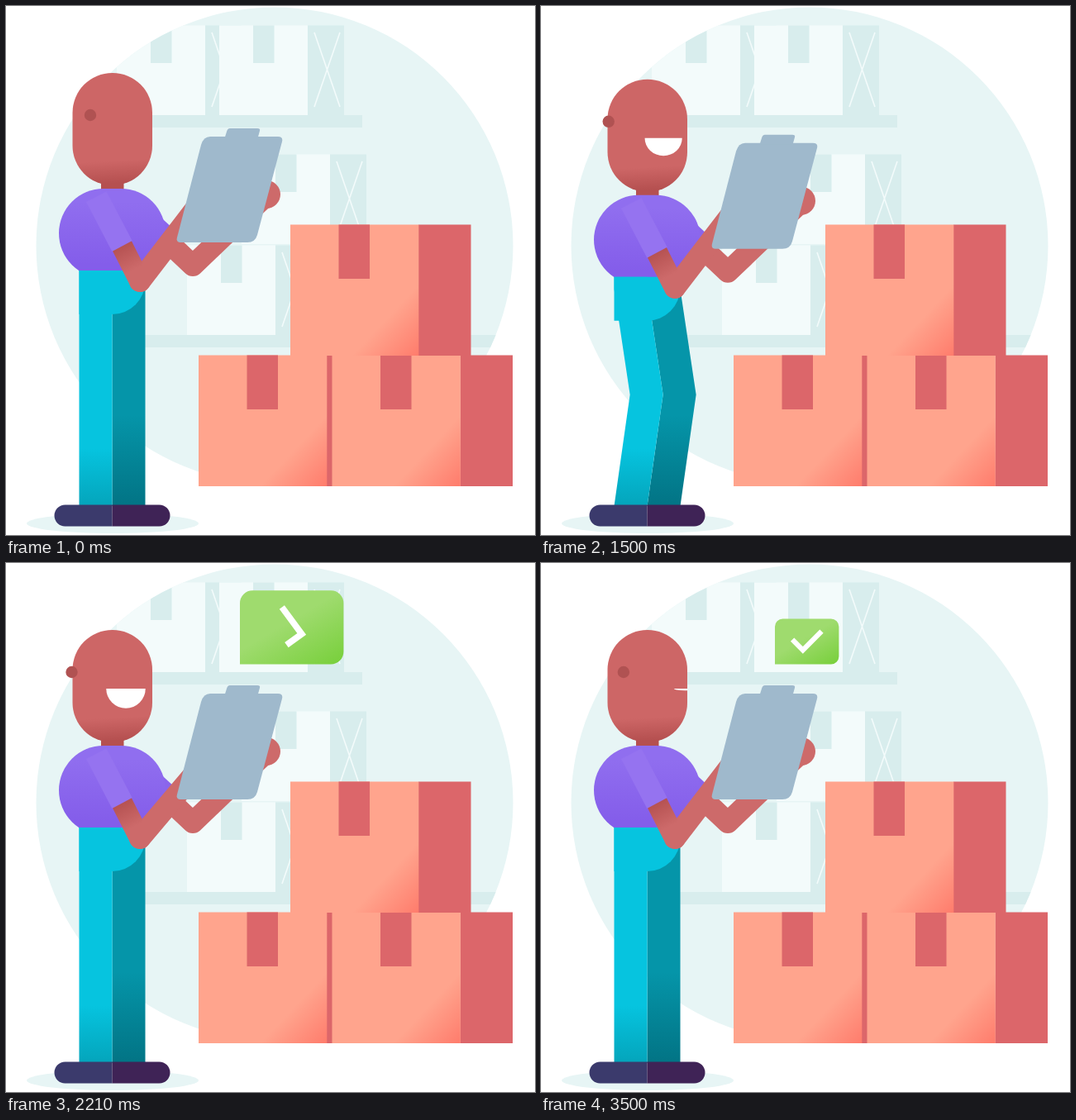
Write an HTML page that moves like this. It is 640 by 640 pixels and loops after 3.57 s.

```html
<!DOCTYPE html>
<html lang="en">
<head>
<meta charset="utf-8">
<title>Warehouse check</title>
<style>
  html, body { margin: 0; width: 100%; height: 100%; overflow: hidden; background: #fff; }
  svg { display: block; width: 100vw; height: 100vh; }
  .skin { fill: none; stroke: #cd6a6a; stroke-width: 26; stroke-linecap: round; stroke-linejoin: round; }
  .pale { fill: #f3fbfb; }
  .mist { fill: #d8eded; }
  .cross { fill: none; stroke: #f3fbfb; stroke-width: 1.6; }
  .card { fill: url(#card); }
  .tape { fill: #dc666a; }
</style>
</head>
<body>
<svg viewBox="0 0 640 640">
  <defs>
    <linearGradient id="card" x1=".73" y1=".74" x2="1" y2="1">
      <stop stop-color="#ffa48d"/><stop offset="1" stop-color="#ff7c6c"/>
    </linearGradient>
    <linearGradient id="green" x1=".5" y1=".4" x2="1" y2="1">
      <stop stop-color="#9fdb6e"/><stop offset="1" stop-color="#77cf3a"/>
    </linearGradient>
    <linearGradient id="face" x1="0" y1="0" x2=".04" y2="1">
      <stop offset=".8" stop-color="#cd6666"/><stop offset="1" stop-color="#b55050"/>
    </linearGradient>
    <linearGradient id="shirt" x2="0" y2="1">
      <stop offset=".15" stop-color="#906eef"/><stop offset=".85" stop-color="#845dea"/>
    </linearGradient>
    <linearGradient id="nearLegFill" gradientUnits="userSpaceOnUse" x1="0" y1="535" x2="0" y2="604">
      <stop stop-color="#06c4df"/><stop offset="1" stop-color="#04a5bc"/>
    </linearGradient>
    <linearGradient id="farLegFill" gradientUnits="userSpaceOnUse" x1="0" y1="495" x2="0" y2="604">
      <stop stop-color="#0595a9"/><stop offset="1" stop-color="#027485"/>
    </linearGradient>
    <linearGradient id="upperArm" gradientUnits="userSpaceOnUse" x1="139" y1="288" x2="155" y2="319">
      <stop stop-color="#b45050"/><stop offset="1" stop-color="#cd6a6a"/>
    </linearGradient>
    <clipPath id="disc"><circle cx="325" cy="290" r="288.5"/></clipPath>
    <clipPath id="headClip"><rect x="80.5" y="81" width="96.5" height="136" rx="48"/></clipPath>
    <clipPath id="shirtClip"><rect x="64" y="221" width="129" height="108" rx="54"/></clipPath>
  </defs>

  <circle cx="325" cy="290" r="288.5" fill="#e7f5f5"/>
  <g id="shelves" clip-path="url(#disc)">
    <path class="mist" d="M110 132H431V147H110ZM130 398H640V413H130Z"/>
  </g>
  <g id="stack"></g>

  <ellipse cx="129" cy="626" rx="104" ry="12" fill="#e7f5f5"/>
  <path id="farLeg" fill="url(#farLegFill)"/>

  <g id="body">
    <path class="skin" d="M190 280L226 314L316 228"/>
    <circle cx="315" cy="228" r="17" fill="#cd6a6a"/>
    <path d="M180 249L204 271L186 291Z" fill="#8a65ec"/>
    <rect x="115" y="200" width="27.5" height="26" fill="#b55050"/>
    <rect x="64" y="221" width="129" height="108" rx="54" fill="url(#shirt)"/>
    <rect x="80.5" y="81" width="96.5" height="136" rx="48" fill="url(#face)"/>
    <g clip-path="url(#headClip)">
      <path id="smile" fill="#fff" d="M-23.75 0H23.75A23.75 23.75 0 0 1 -23.75 0Z"/>
    </g>
    <circle id="ear" cy="132" r="7.2" fill="#b05252"/>
    <path fill="#06c4df" d="M88.5 320H168.5V333A40 40 0 0 1 128.5 373H88.5Z"/>
  </g>

  <path id="nearLeg" fill="url(#nearLegFill)"/>
  <path d="M128.5 603.5V629.5H71.5A13 13 0 0 1 71.5 603.5Z" fill="#3b3a6c"/>
  <path d="M128.5 603.5V629.5H185.5A13 13 0 0 0 185.5 603.5Z" fill="#3f2356"/>

  <g id="front">
    <path id="forearm" class="skin" d="M162 333L235 238"/>
    <path class="skin" style="stroke:url(#upperArm)" d="M140.5 290.5L162 333"/>
    <g clip-path="url(#shirtClip)">
      <path d="M97 237L121.5 224.5L152.7 284L128.3 297Z" fill="#9573f0"/>
    </g>
    <g fill="#9fb9cc">
      <path d="M247 158H329Q335.500 158 334 164L304 277Q301.500 286 292 286H211Q205.500 286 207 280L236 168Q239 158 247 158Z"/>
      <path d="M271 148H304Q308 148 307 151L304.500 160H264.500L267 152Q268 148 271 148Z"/>
    </g>
  </g>

  <g id="badge">
    <path d="M0 0V-67.5A14 14 0 0 1 14 -81.5H100.500A14 14 0 0 1 114.500 -67.5V-14A14 14 0 0 1 100.500 0Z" fill="url(#green)"/>
    <path id="tick" d="M-26 -3.5L-7.200 15.500L26.300 -18.200" fill="none" stroke="#fff" stroke-width="9"/>
  </g>
</svg>

<script>
  const FPS = 14, FRAMES = 50, LOOP = 3570;
  const $ = id => document.getElementById(id);
  const rect = (cls, x, y, w, h) =>
    `<rect class="${cls}" x="${x}" y="${y}" width="${w}" height="${h}"/>`;

  const paleBox = (x, y) =>
    rect('mist', x + 107, y, 44, 108.5) +
    `<path class="cross" d="M${x + 115} ${y + 8.5}l31 90m0 -90l-31 90"/>` +
    rect('pale', x, y, 107, 108.5) + rect('mist', x + 41, y, 25.5, 45.5);
  const cardBox = (x, y) =>
    rect('tape', x + 155, y, 63.5, 158.5) + rect('card', x, y, 155.3, 158.5) +
    rect('tape', x + 58.5, y, 37.5, 65.5);

  const fill = (id, make, spots) =>
    $(id).insertAdjacentHTML('beforeend', spots.map(p => make(...p)).join(''));
  fill('shelves', paleBox, [[134, 23.5], [258, 23.5], [285, 179.5], [219, 289.5]]);
  fill('stack', cardBox, [[233, 422.5], [394.5, 422.5], [344, 264.5]]);

  const ramp = (f, a, b) => Math.min(1, Math.max(0, (f - a) / (b - a)));
  const ease = (f, a, b) => { const u = ramp(f, a, b); return u * u * (3 - 2 * u); };
  const swing = (f, a, b) => Math.max(0, Math.sin(Math.PI * ramp(f, a, b))) ** 1.5;

  // Grow past full size, then settle.
  const pop = f => f < 31.1
    ? 1.1 * ease(f, 28.5, 31.1)
    : 1 + 0.1 * (1 - ramp(f, 31.1, 34.9)) ** 3;

  function legPath(x, dip) {
    const bend = 2.45 * dip, knee = 467 + 0.4 * dip, hip = 335 + dip;
    return `M${x} ${320 + dip}V${hip}L${x + bend} ${knee}L${x} 605h40` +
      `L${x + 40 + bend} ${knee}L${x + 40} ${hip}V${320 + dip}Z`;
  }

  function draw(f) {
    const set = (id, value) => $(id).setAttribute('transform', value);

    const dip = 8.8 * swing(f, 16, 24);
    set('body', `translate(0 ${dip})`);
    set('front', `translate(0 ${dip})`);
    $('nearLeg').setAttribute('d', legPath(88.5, dip));
    $('farLeg').setAttribute('d', legPath(128.5, dip));

    const turn = ease(f, 16.2, 22.15) - ease(f, 43.5, 50.3);
    $('ear').setAttribute('cx', 102 - 22.5 * turn);
    $('smile').style.display = turn > 0 ? '' : 'none';
    set('smile', `translate(${177 - 32 * turn} 152) scale(${0.5 + 0.5 * turn} ${turn})`);

    set('forearm', `rotate(${10 * swing(f, 24.7, 32)} 162 333)`);

    // The exit mirrors the entrance in time.
    const size = pop(f < 40 ? f : 79 - f);
    const spin = ease(f, 26.5, 33);
    $('badge').style.display = size > 0 ? '' : 'none';
    set('badge', `translate(283 122.5) scale(${size})`);
    set('tick', `translate(57.25 -40.75) rotate(${360 * (spin - 1)}) scale(${spin})`);
  }

  const start = performance.now();
  function tick() {
    const ms = Math.max(0, performance.now() - start) % LOOP;
    draw(Math.floor((ms + 4.9) * FPS / 1000) % FRAMES);
    requestAnimationFrame(tick);
  }
  tick();
</script>
</body>
</html>
```
